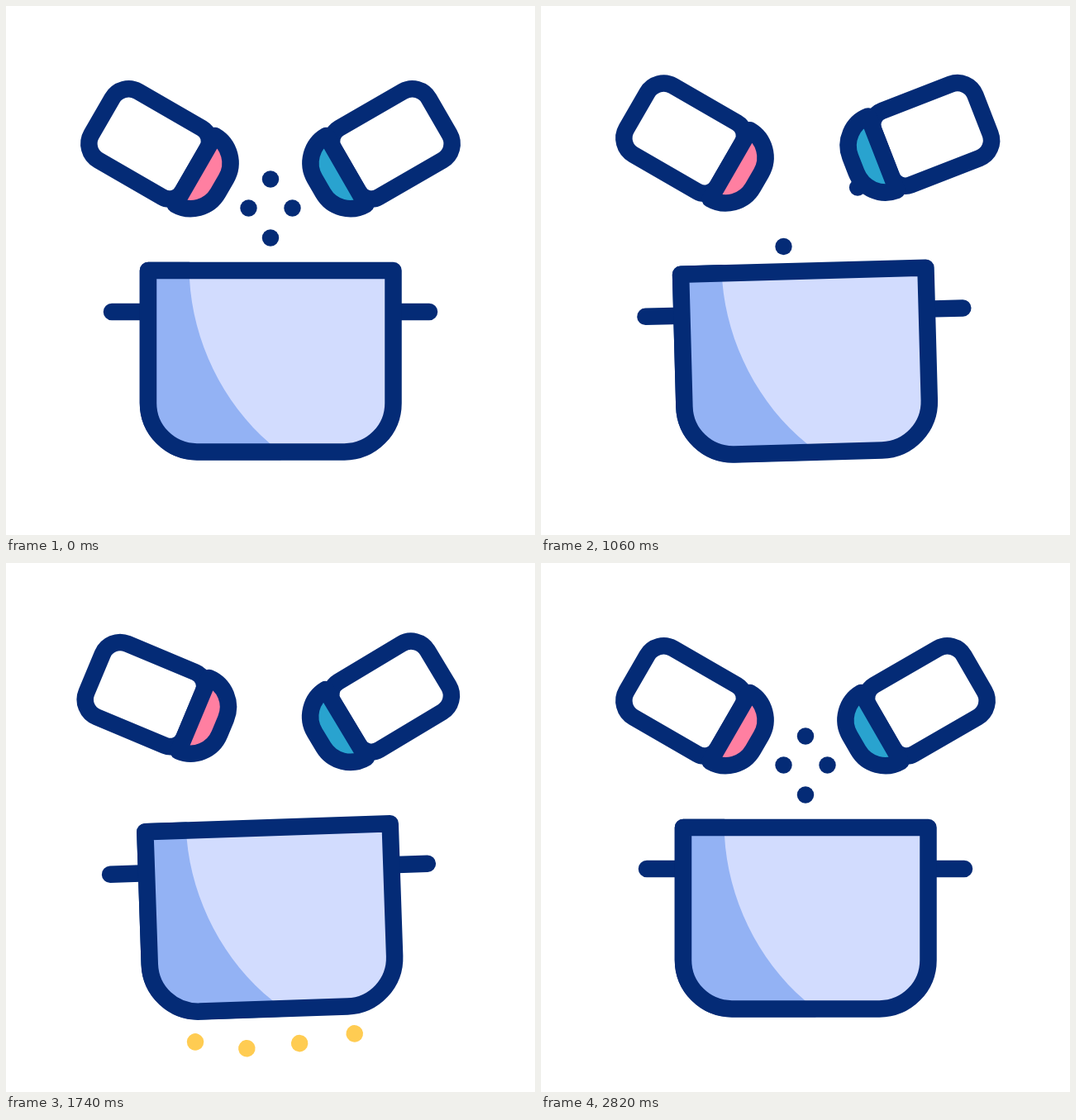
Write an HTML page with a canvas that moves like this. It is 640 by 640 pixels and loops after 3.4 s.

```html
<!DOCTYPE html>
<html lang="en">
<head>
<meta charset="utf-8">
<title>Seasoning the pot</title>
<style>
html, body { margin: 0; width: 100%; height: 100%; overflow: hidden; background: #fff; }
canvas { display: block; }
</style>
</head>
<body>
<canvas id="stage" width="640" height="640"></canvas>
<script>
const ctx = document.getElementById('stage').getContext('2d');
const LOOP = 3400, STEP = 20;
const START = 220, MID = 1060, END = 2360;
const NAVY = '#042b76', LIGHT = '#d2dcfe', SHADE = '#93b2f4';
const PINK = '#ff7fa1', TEAL = '#29a3cf', YELLOW = '#ffcc52';

const body = new Path2D('M46 -30A18 18 0 0 0 28 -48H-61A23 23 0 0 0 -84 -25V25A23 23 0 0 0 -61 48H28A18 18 0 0 0 46 30Z');
const cap = new Path2D('M46 -48A38 38 0 0 1 84 -10V10A38 38 0 0 1 46 48Z');
const pot = new Path2D('M172 320H468.5V480.4A59 59 0 0 1 409.5 539.4H231A59 59 0 0 1 172 480.4Z');
const shade = new Path2D('M172 320H221.5L222 330C226 405 262 480 319 529L330 539H231A59 59 0 0 1 172 480Z');
const handles = new Path2D('M128 370H172M468 370H512');

// Flame strokes: x, y, dx, dy.
const flames = [[260, 562, -36, 14], [306, 561, -20, 25], [333, 560, 17, 22], [375, 560, 42, 12.5]];
const bursts = [500, 1270, 2230], BURST = 480;

// Grains that hang in the air, fall into the pot and are shaken out again.
const hanging = [
  { x: 320, y: 209.5, side: -1, leave: 400, fall: 563, back: 2085 },
  { x: 293.5, y: 244.5, side: -1, leave: 313, fall: 1070, back: 2140 },
  { x: 346.5, y: 244.5, side: 1, leave: 220, fall: 533, back: 2140 },
  { x: 320, y: 280.5, side: 1, leave: 220, fall: 744, back: 2085 }
];
// Grains that fly from a shaker straight into the pot.
const flying = [
  { side: 1, start: 960, x: 327 },
  { side: 1, start: 1232, x: 358 },
  { side: -1, start: 1240, x: 338 },
  { side: -1, start: 1688, x: 292 }
];
const FLIGHT = 570, RETURN = 400, IN_POT = 340;

const clamp = x => Math.min(1, Math.max(0, x));
const smooth = x => { x = clamp(x); return x * x * (3 - 2 * x); };
const mix = (a, b, p) => a + (b - a) * p;
const rad = deg => deg * Math.PI / 180;

// Strength of all shaking: rises at the start, dies away at the end.
const strength = t => smooth((t - START) / 120) * smooth((END - t) / 240);

// Swing with a phase given at MID; drag slows it down over time.
function swing(t, size, period, phase, drag = 0) {
  const s = t - MID;
  return size * strength(t) * Math.cos(2 * Math.PI * (phase + s / period - drag * s * s));
}

function outline(path, fill) {
  ctx.fillStyle = fill;
  ctx.fill(path);
  ctx.strokeStyle = NAVY;
  ctx.stroke(path);
}

function dot(x, y) {
  ctx.fillStyle = NAVY;
  ctx.beginPath();
  ctx.arc(x, y, 10.2, 0, 7);
  ctx.fill();
}

function drawGrains(t) {
  for (const { x, y, side, leave, fall, back } of hanging) {
    if (t < leave + fall) {
      dot(x, mix(y, IN_POT, clamp((t - leave) / fall) ** 2));
    } else if (t >= back) {
      const p = clamp((t - back) / RETURN);
      dot(mix(320 + 65 * side, x, p), mix(196.5 + 14.5 * side, y, p));
    }
  }
  for (const { side, start, x } of flying) {
    const p = (t - start) / FLIGHT;
    if (p > 0 && p < 1) dot(mix(320 + 75 * side, x, p), mix(194, IN_POT, p));
  }
}

function drawShaker(mirrored, turn, lift, color) {
  ctx.save();
  if (mirrored) ctx.transform(-1, 0, 0, 1, 640, 0);
  ctx.translate(188.7 + 0.55 * turn, 175.5 + lift);
  ctx.rotate(rad(30 + turn));
  outline(body, '#fff');
  outline(cap, color);
  ctx.restore();
}

function drawFlames(t) {
  const begin = bursts.find(b => t > b && t < b + BURST);
  if (!begin) return;
  const p = (t - begin) / BURST;
  const tail = smooth((p - 0.2) / 0.8), head = smooth(p / 0.5);
  ctx.strokeStyle = YELLOW;
  ctx.beginPath();
  for (const [x, y, dx, dy] of flames) {
    ctx.moveTo(x + dx * tail, y + dy * tail);
    ctx.lineTo(x + dx * head, y + dy * head);
  }
  ctx.stroke();
}

function drawPot(t) {
  const turn = 0.4 * strength(t) + swing(t, 2.7, 655, 0.379);
  const drop = 2.1 * strength(t) + 0.95 * turn;
  ctx.save();
  ctx.translate(320, 430 + drop);
  ctx.rotate(rad(turn));
  ctx.translate(-320, -430);
  drawFlames(t);
  ctx.strokeStyle = NAVY;
  ctx.stroke(handles);
  ctx.fillStyle = LIGHT;
  ctx.fill(pot);
  outline(shade, SHADE);
  ctx.fillStyle = LIGHT;
  ctx.fill(pot);
  ctx.fillStyle = SHADE;
  ctx.fill(shade);
  ctx.stroke(pot);
  ctx.restore();
}

function draw(now) {
  const t = Math.floor(now % LOOP / STEP) * STEP;
  ctx.fillStyle = '#fff';
  ctx.fillRect(0, 0, 640, 640);
  ctx.lineWidth = 20.5;
  ctx.lineCap = ctx.lineJoin = 'round';
  drawGrains(t);
  drawShaker(false, swing(t, 10.3, 495, 0.25), swing(t, 14, 525, 0.33), PINK);
  drawShaker(true, swing(t, 10, 505, 0.42), swing(t, 14, 520, 0.5, 2.5e-7), TEAL);
  drawPot(t);
}

let origin;
function tick(now) {
  origin ??= now;
  draw(now - origin);
  requestAnimationFrame(tick);
}
draw(0);
requestAnimationFrame(tick);
</script>
</body>
</html>
```
